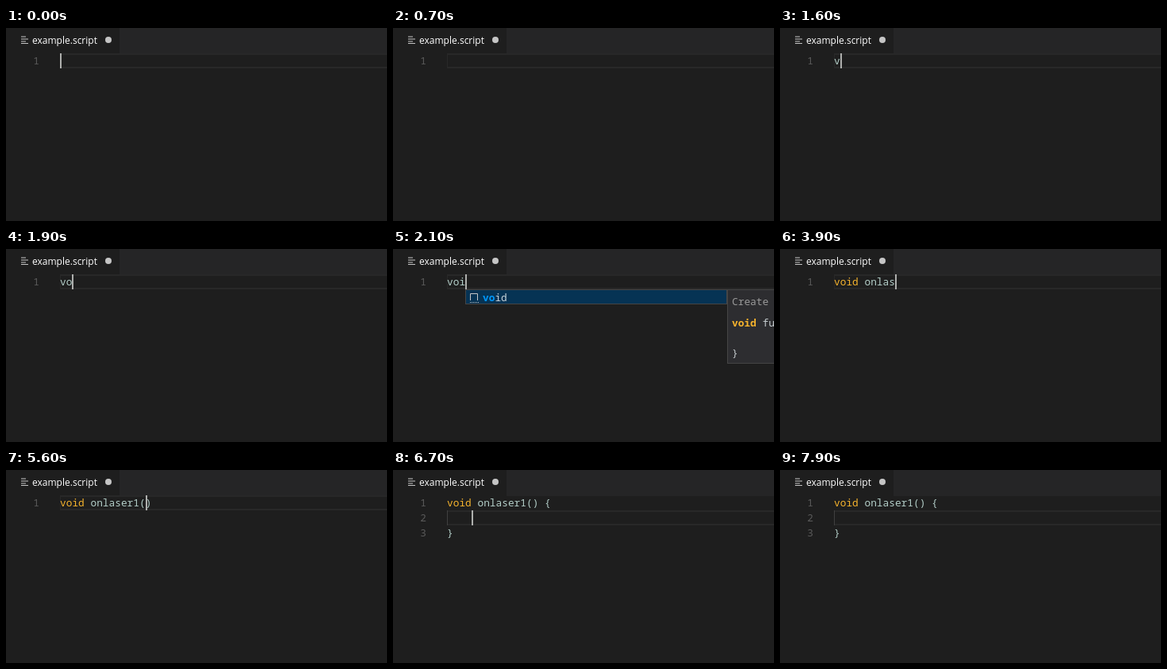
Recreate the animation shown at these times as an HTML page. Size 480 by 244 pixels, loop 8000 ms.

```html
<!DOCTYPE html>
<html lang="en">
<head>
<meta charset="utf-8">
<title>Editor</title>
<style>
  html, body { margin: 0; width: 100%; height: 100%; overflow: hidden; background: #1e1e1e; }
  #stage { position: relative; width: 480px; height: 244px; overflow: hidden; background: #1e1e1e;
    font: 12.828px/19px "Noto Sans Mono", "DejaVu Sans Mono", monospace; color: #b4cfc9; white-space: pre; }
  #stage div, #stage svg { position: absolute; box-sizing: border-box; }
  #bar { left: 143px; top: 0; width: 337px; height: 33px; background: #252526; }
  #title { left: 33px; top: 6px; font: 12px/19px "Open Sans", "Noto Sans", sans-serif; color: #fff; }
  #row { left: 68px; width: 420px; height: 19px; border: 2px solid #282828; border-right: 0; border-left-width: 1px; }
  #nums { left: 0; top: 32px; width: 42px; text-align: right; color: #5a5a5a; }
  #code { left: 68px; top: 32px; }
  #caret { width: 2px; height: 19px; background: #aeafad; }
  #guide { left: 68px; top: 51px; width: 1px; height: 19px; background: #404040; }
  #popup { top: 51px; width: 330px; height: 19px; background: #063354; border: 1px solid #454545; }
  #name { left: 21px; top: 0; line-height: 18px; color: #c9d3da; }
  #name b { color: #0097fb; }
  #info { left: 329px; top: -1px; width: 330px; height: 94px; background: #2d2d30; border: 1px solid #454545; }
  #info div { left: 5px; color: #c8cfd2; }
  .key { color: #f5b32d; }
  b { font-weight: 600; }
</style>
</head>
<body>
<div id="stage">
  <div id="bar"></div>
  <svg width="143" height="32" fill="#c5c5c5" style="left:0;top:0">
    <path d="M19 11h6M19 14h9M19 17h6M19 19.5h9" stroke="#c5c5c5" stroke-width="1.2"/>
    <circle cx="129" cy="15" r="4"/>
  </svg>
  <div id="title">example.script</div>
  <div id="row"></div>
  <div id="guide"></div>
  <div id="nums"></div>
  <div id="code"></div>
  <div id="popup">
    <svg width="14" height="16" fill="none" stroke="#c5c5c5" style="left:3px;top:1px">
      <path d="M2.5 12V3.5h9V12"/>
      <path d="M2 14.5h11" stroke-dasharray="1 1"/>
    </svg>
    <div id="name"></div>
    <div id="info">
      <div style="top:5px;color:#9a9a9a">Create a function</div>
      <div style="top:32px"><b class="key">void</b> function() {</div>
      <div style="top:70px">}</div>
    </div>
  </div>
  <div id="caret"></div>
</div>
<script>
const LOOP = 8000, LEFT = 68, TOP = 32, CHAR = 7.697, LINE = 19;
const $ = id => document.getElementById(id);

// time, text, caret column, matched letters in the suggestion (0 = closed)
const steps = [
  [0, "", 0, 0],
  [1500, "v", 1, 0],
  [1900, "vo", 2, 0],
  [2000, "vo", 2, 2],
  [2100, "voi", 3, 2],
  [2200, "voi", 3, 3],
  [2300, "void", 4, 3],
  [2400, "void", 4, 4],
  [2800, "void ", 5, 4],
  [3100, "void ", 5, 0],
  [3500, "void o", 6, 0],
  [3600, "void on", 7, 0],
  [3700, "void onl", 8, 0],
  [3800, "void onla", 9, 0],
  [3900, "void onlas", 10, 0],
  [4100, "void onlase", 11, 0],
  [4300, "void onlaser", 12, 0],
  [4700, "void onlaser1", 13, 0],
  [5600, "void onlaser1()", 14, 0],
  [6000, "void onlaser1()", 15, 0],
  [6300, "void onlaser1() ", 16, 0],
  [6500, "void onlaser1() {}", 17, 0],
  [6700, "void onlaser1() {\n\n}", 4, 0]
];
const hidden = [[300, 800], [1300, 1500], [5100, 5600], [6900, 7400], [7900, LOOP]];

const show = (id, on) => $(id).style.visibility = on ? "visible" : "hidden";
let last;

function drawStep(step) {
  const [, text, col, match] = step;
  const lines = text.split("\n").length, row = lines > 1 ? 1 : 0;
  const x = Math.round(LEFT + col * CHAR), y = TOP + row * LINE;
  $("code").innerHTML = text.replace("void", '<span class="key">void</span>');
  $("nums").textContent = lines > 1 ? "1\n2\n3" : "1";
  $("row").style.top = y + "px";
  $("caret").style.left = x + "px";
  $("caret").style.top = y + "px";
  $("popup").style.left = x + "px";
  $("name").innerHTML = "<b>" + "void".slice(0, match) + "</b>" + "void".slice(match);
  show("popup", match);
  show("guide", row);
}

function frame(now) {
  const t = now % LOOP;
  const step = steps.findLast(s => s[0] <= t) || steps[0];
  if (step !== last) drawStep(last = step);
  show("caret", !hidden.some(([a, b]) => t >= a && t < b));
  requestAnimationFrame(frame);
}
frame(0);
</script>
</body>
</html>
```
